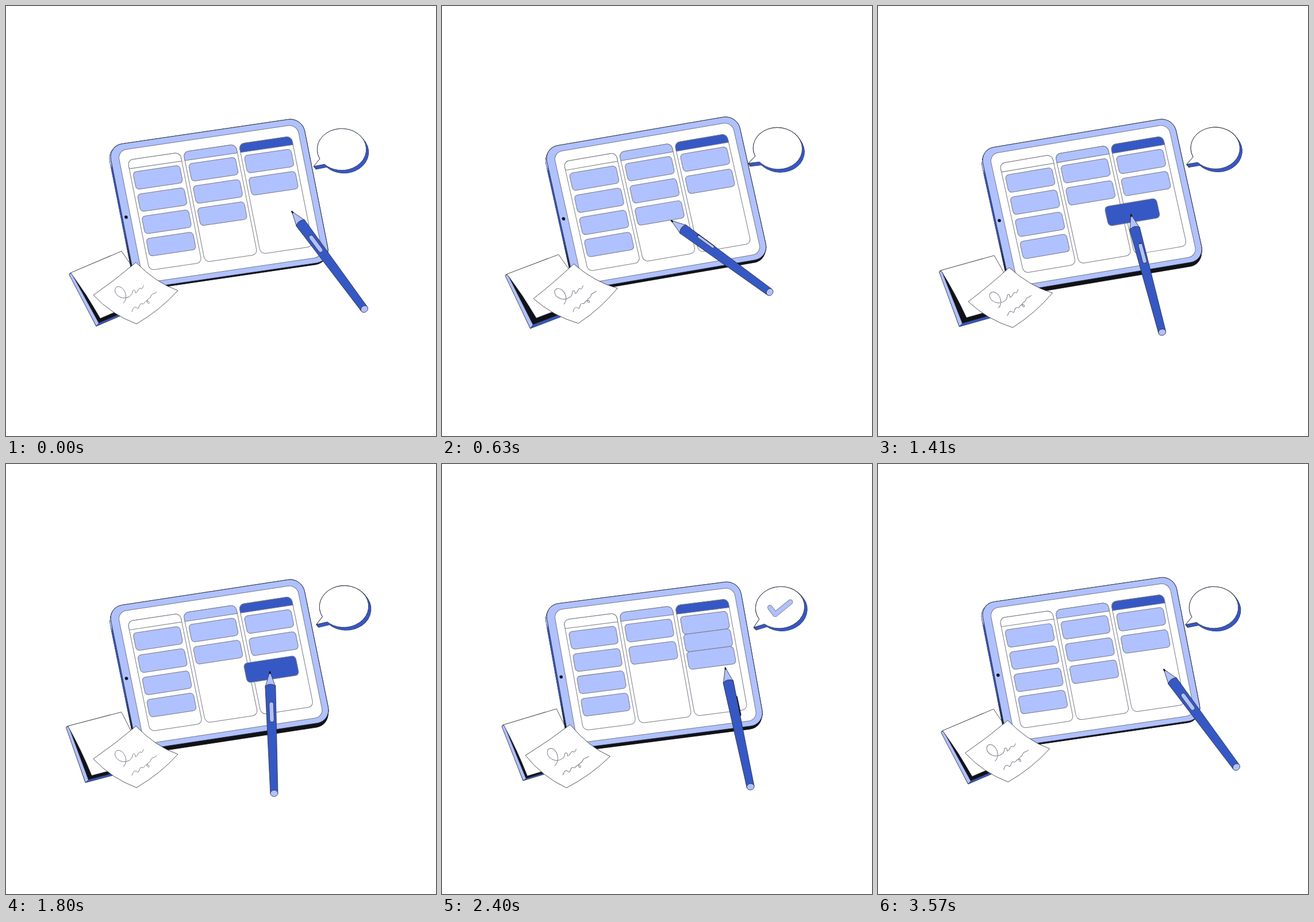
An HTML page with a canvas that plays this animation: 748x748 px, repeating every 3600 ms.

```html
<!DOCTYPE html>
<html lang="en">
<head>
<meta charset="utf-8">
<title>Task board</title>
<style>
  html, body { margin: 0; width: 100%; height: 100%; overflow: hidden; background: #fff; }
  canvas { display: block; width: 748px; height: 748px; }
</style>
</head>
<body>
<canvas id="stage" width="748" height="748"></canvas>
<script>
const ctx = document.getElementById('stage').getContext('2d');
const LOOP = 3600, STEP = 30;
const LIGHT = '#b0c1ff', BLUE = '#3658c4', BLACK = '#111217', LINE = '#2c2e38', SOFT = '#777b86';
const TAU = Math.PI * 2, RAD = Math.PI / 180;

const clamp = (x, a = 0, b = 1) => Math.min(b, Math.max(a, x));
const ramp = (t, a, b) => { const p = clamp((t - a) / (b - a)); return p * p * (3 - 2 * p); };
const mix = (a, b, p) => a + (b - a) * p;
const mixAll = (a, b, p) => a.map((v, i) => mix(v, b[i], p));

// Everything floats on one slow wave: its sine and cosine.
function sway(t) {
  const a = TAU * t / LOOP;
  return [Math.sin(a), Math.cos(a)];
}

function paint(path, fill, stroke = LINE, width = 0.8) {
  if (fill) { ctx.fillStyle = fill; ctx.fill(path); }
  if (stroke) { ctx.strokeStyle = stroke; ctx.lineWidth = width; ctx.stroke(path); }
}
function poly(...pts) {
  const p = new Path2D();
  pts.forEach(([x, y]) => p.lineTo(x, y));
  p.closePath();
  return p;
}
function box(x, y, w, h, r) {
  const p = new Path2D();
  p.roundRect(x, y, w, h, r);
  return p;
}
function scoped(draw) { ctx.save(); draw(); ctx.restore(); }

// Sweep a shape along an offset to give it depth.
function extrude(path, dx, dy, fill) {
  const n = 8;
  for (const edge of [true, false]) {
    for (let k = n; k >= 0; k--) scoped(() => {
      ctx.translate(dx * k / n, dy * k / n);
      paint(path, edge ? null : fill, edge ? LINE : null, 1);
    });
  }
}

// Notebook: rocks around its top edge while its pages lift.
const PAGE = [108, 461], SPINE = [147.5, 556], EDGE = [93, -32];

function drawBook(t) {
  const [s, c] = sway(t);
  const [ax, ay] = PAGE, [dx, dy] = SPINE;
  const px = dx + 9 + 2.8 * s - c, py = dy - 13 - 5.3 * s, rim = 5 + 1.5 * s;
  const along = (x, y, k = 1) => [x + EDGE[0] * k, y + EDGE[1] * k];
  scoped(() => {
    ctx.translate(167 + 2 * s, 427 + 5 * s);
    ctx.rotate(-0.073 * c);
    ctx.translate(-167, -427);
    paint(poly([ax, ay], [dx, dy], along(dx, dy, 0.8), along(ax, ay, 0.8)), BLUE);
    paint(poly([ax + 4, ay], [dx + 4, dy - rim], along(dx + 4, dy - rim, 0.8), along(ax, ay, 0.8)), BLACK);
    paint(poly([ax - 1, ay + 2], [ax + 3, ay - 1], [dx + 5, dy - rim], [dx, dy]), LIGHT);
    const page = new Path2D();
    page.moveTo(ax + 2, ay - 1);
    page.lineTo(...along(ax, ay));
    page.lineTo(...along(px, py));
    page.lineTo(px, py);
    page.quadraticCurveTo((ax + px) / 2 + 4, (ay + py) / 2 - 1, ax + 2, ay - 1);
    paint(page, '#fff');
  });
}

// Loose sheet: bobs and swings from a point above it.
const SHEET = new Path2D('M152 503Q191 476 226 446Q260 481 299 495Q268 529 227 553Q184 537 152 503Z');
const SCRIBBLES = [
  'M204 517C214 507 206 488 195 488C187 489 187 502 200 507C209 510 219 505 220 498C220 493 225 492 225 499C229 500 230 490 234 491C238 494 238 487 240 486',
  'M219 532C222 522 225 523 229 526C232 528 231 516 237 518C241 520 240 513 246 513C251 514 249 520 246 516C243 509 250 511 252 505C254 498 258 503 262 497'
].map(d => new Path2D(d));

function drawSheet(t) {
  const [s, c] = sway(t);
  scoped(() => {
    ctx.translate(227, 401 + 5 * (1 - c));
    ctx.rotate(-0.078 * s);
    ctx.translate(0, 45);
    ctx.scale(1, 1 - 0.035 * s);
    ctx.translate(-227, -446);
    paint(SHEET, '#fff');
    SCRIBBLES.forEach(p => paint(p, null, SOFT, 1));
  });
}

// Pen: reaches for a card, drags it, then rolls back home.
const HOME = [497, 357, 53.4, 0], GRAB = [376, 368, 32, -65], DROP = [459, 361, 88, -5];

function penAt(t) {
  const reach = ramp(t, 0, 870), drag = ramp(t, 900, 1640);
  const back = ramp(t, 1800, 2700), turn = ramp(t, 1850, 3400);
  const pose = mixAll(mixAll(HOME, GRAB, reach), DROP, drag);
  const dip = 13 * Math.sin(Math.PI * reach), swing = Math.sin(Math.PI * turn);
  return [
    mix(pose[0], HOME[0], back) + 7 * swing,
    mix(pose[1], HOME[1], back) + dip - 5 * swing,
    mix(pose[2], HOME[2], turn),
    mix(pose[3], HOME[3] - 360 * (turn > 0), turn)
  ];
}

const CONE = new Path2D('M0 0L26 -8.8L26 8.8Z');
const BARREL = new Path2D('M25 -9Q19 0 25 9L212 6.5L212 -6.5Z');
const CAP = new Path2D();
CAP.ellipse(212, 0, 5.5, 6.5, 0, 0, TAU);

function drawPen(t) {
  const [x, y, angle, roll] = penAt(t);
  const s = Math.sin(roll * RAD), c = Math.cos(roll * RAD);
  const clip = () => {
    if (Math.abs(s) > 0.3) paint(box(52, 8.3 * s - 2.3, 36, 4.6, 2), BLACK, null);
  };
  scoped(() => {
    ctx.translate(x, y);
    ctx.rotate(angle * RAD);
    ctx.lineJoin = 'round';
    if (c <= 0.1) clip();
    paint(CONE, LIGHT);
    paint(poly([-0.5, -1], [4, -1.6], [4, 1.6], [-0.5, 1]), BLACK, null);
    paint(BARREL, BLUE);
    paint(CAP, LIGHT);
    if (c > 0.1) {
      clip();
      const w = 3.8 * c;
      paint(box(53, 7 * s - w, 35, 2 * w, w), LIGHT);
    }
  });
}

// Tablet with three columns of cards.
const COL = 97, COL_W = 91.5, COL_H = 192, HEAD = 15;
const CARD_X = 4.8, CARD_Y = 21.5, CARD_W = 81.5, CARD_H = 30.5, PITCH = 38.7;
const GAP = PITCH - CARD_H, PUSH = PITCH + 2 * GAP;
const FACE = box(-28, -29, 338, 250, 24);
const SCREEN = box(-14, -18.5, 313, 230.5, 15);
const CARD = box(-CARD_W / 2, -CARD_H / 2, CARD_W, CARD_H, 6);
const cardCentre = (col, y) => [col * COL + CARD_X + CARD_W / 2, y + CARD_Y + CARD_H / 2];

function tabletMatrix(t) {
  const [s, c] = sway(t);
  return new DOMMatrix()
    .translate(211.5, 270.9 - 2.8 * c + 1.3 * s)
    .rotate(-1.45 * s + 0.16 * c)
    .multiply(new DOMMatrix([0.997, -0.149, 0.2005, 0.998, 0, 0]));
}

function drawColumn(i, headFill, cards) {
  const x = i * COL;
  paint(box(x, 0, COL_W, COL_H, 9), '#fff', SOFT, 1);
  scoped(() => {
    ctx.beginPath();
    ctx.rect(x, HEAD, COL_W + 10, COL_H);
    ctx.clip();
    cards.forEach(y => scoped(() => {
      ctx.translate(...cardCentre(i, y));
      paint(CARD, LIGHT, SOFT, 1);
    }));
  });
  paint(box(x, 0, COL_W, HEAD, [9, 9, 0, 0]), headFill, SOFT, 1);
}

function drawTablet(t) {
  const [s, c] = sway(t), m = tabletMatrix(t);
  const side = ctx.createLinearGradient(0, -29, 0, 221);
  [[0, LIGHT], [0.12, LIGHT], [0.15, BLUE], [0.6, BLUE], [0.88, BLACK], [1, BLACK]]
    .forEach(([k, color]) => side.addColorStop(k, color));

  // A moving card closes the gap to its neighbour, then pushes it along.
  const rise = PUSH * ramp(t, 2280, 2600), fall = PUSH * ramp(t, 2920, 3300);
  const shove = (d, k) => clamp(d - k * GAP, 0, PITCH);
  const dropped = t >= 2040;
  const todo = [0, 1, 2, 3].map(k => k * PITCH);
  const doing = [-1, 0, 1].map(k => k * PITCH + shove(fall, k + 1));
  const done = [0, 1, 2].slice(0, dropped ? 3 : 2).map(k => k * PITCH - shove(rise, 2 - k));

  scoped(() => {
    ctx.transform(m.a, m.b, m.c, m.d, m.e, m.f);
    extrude(FACE, -2.5, 4.6 - 2.2 * c + 0.7 * s, side);
    paint(FACE, LIGHT);
    paint(SCREEN, '#fff', SOFT, 1);
    const cam = new Path2D();
    cam.arc(-21.6, 96.3, 2.8, 0, TAU);
    paint(cam, BLACK, null);
    drawColumn(0, '#fff', todo);
    drawColumn(1, LIGHT, doing);
    drawColumn(2, BLUE, done);
  });
  if (!dropped) drawHeldCard(t, m);
}

function drawHeldCard(t, m) {
  const held = ramp(t, 840, 950) * (1 - ramp(t, 1860, 2040));
  const [px, py] = penAt(t);
  const slot = m.transformPoint(new DOMPoint(...cardCentre(t < 1400 ? 1 : 2, 2 * PITCH)));
  const color = mixAll([176, 193, 255], [54, 88, 196], held).map(Math.round);
  scoped(() => {
    ctx.transform(m.a, m.b, m.c, m.d, mix(slot.x, px + 2.5, held), mix(slot.y, py - 4, held));
    ctx.scale(1 + 0.11 * held, 1 + 0.11 * held);
    paint(CARD, `rgb(${color})`, SOFT, 1);
  });
}

// Speech bubble with a tick that is drawn and wiped away.
const BALLOON = new Path2D();
BALLOON.moveTo(-49, 29.5);
BALLOON.ellipse(0, 0, 42.7, 36.2, 0, 2.67, 2.35 + TAU);
BALLOON.closePath();
const TICK = new Path2D('M-17.5 0L-8.5 12L18 -9.5'), TICK_LEN = 49.2;

function drawBubble(t) {
  const [s, c] = sway(t);
  const from = ramp(t, 3150, 3400), to = ramp(t, 2080, 2350);
  scoped(() => {
    ctx.translate(586 - 2 * c - 1.2 * s, 248.7 + 0.8 * c - 1.5 * s);
    scoped(() => {
      ctx.rotate((-1 + c + 5.3 * s) * RAD);
      extrude(BALLOON, 4, 5, BLUE);
      paint(BALLOON, '#fff');
    });
    if (to - from < 0.01) return;
    ctx.lineCap = ctx.lineJoin = 'round';
    ctx.setLineDash([TICK_LEN * (to - from), 200]);
    ctx.lineDashOffset = -TICK_LEN * from;
    paint(TICK, null, SOFT, 9);
    paint(TICK, null, LIGHT, 7.2);
  });
}

function frame(now) {
  const t = Math.floor((now % LOOP) / STEP) * STEP;
  ctx.fillStyle = '#fff';
  ctx.fillRect(0, 0, 748, 748);
  drawBook(t);
  drawTablet(t);
  drawSheet(t);
  drawBubble(t);
  drawPen(t);
  requestAnimationFrame(frame);
}
frame(0);
</script>
</body>
</html>
```
